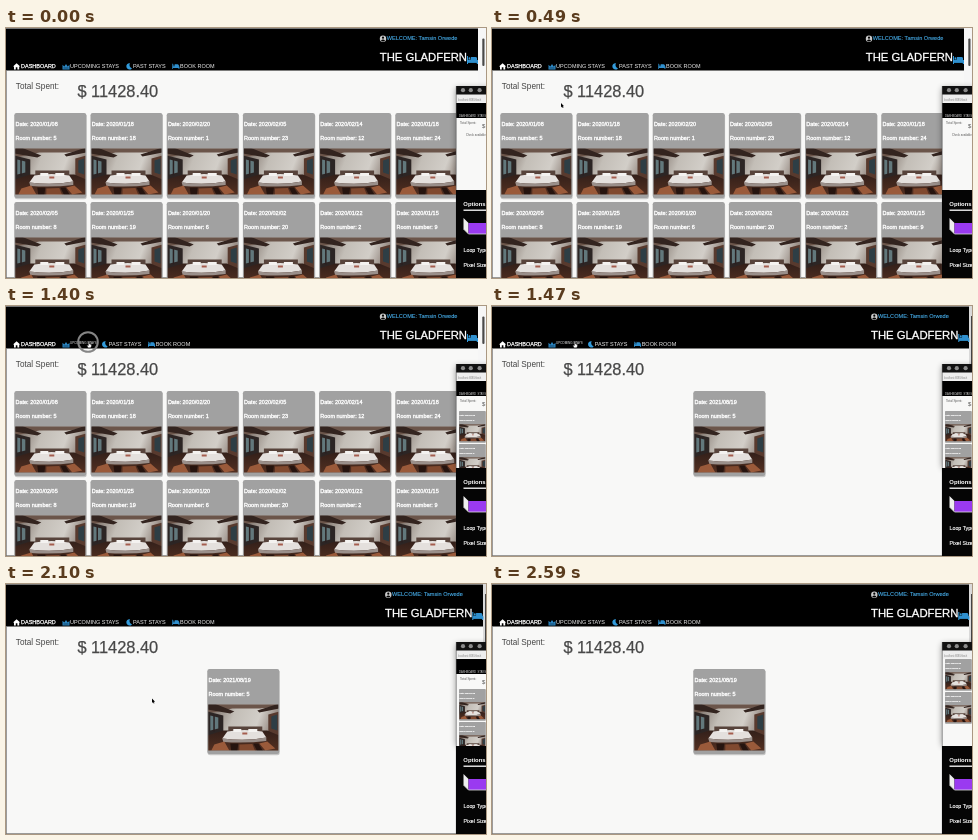
Recreate the animation shown at these times as an HTML page. Size 480 px wide and 250 px high, loop 2660 ms.

```html
<!DOCTYPE html>
<html lang="en">
<head>
<meta charset="utf-8">
<title>Room dashboard</title>
<style>
html, body { margin: 0; width: 100%; height: 100%; overflow: hidden; background: #f8f8f7; }
svg { display: block; width: 480px; height: 250px; }
text { font-family: "Liberation Sans", Arial, sans-serif; white-space: pre; }
.nav { font-size: 5.5px; fill: #eee; }
.card { font-size: 5.5px; fill: #fff; stroke: #fff; stroke-width: .34px; }
</style>
</head>
<body>
<svg viewBox="0 0 480 250">
  <defs>
    <linearGradient id="wall" x2="1" y2=".25">
      <stop offset="0" stop-color="#6d5f57"/>
      <stop offset=".4" stop-color="#c3beb7"/>
      <stop offset=".75" stop-color="#d2cec8"/>
      <stop offset="1" stop-color="#8d8078"/>
    </linearGradient>
    <linearGradient id="floor" x2="0" y2="1">
      <stop offset="0" stop-color="#33201a"/>
      <stop offset="1" stop-color="#543021"/>
    </linearGradient>
    <filter id="soft"><feGaussianBlur stdDeviation=".5"/></filter>
    <filter id="shade" x="-50%" y="-20%" width="200%" height="140%"><feGaussianBlur stdDeviation="3"/></filter>
    <clipPath id="frame"><rect width="70" height="46"/></clipPath>
    <clipPath id="view"><rect x="450" y="74" width="30" height="88"/></clipPath>
    <g id="room" clip-path="url(#frame)">
      <rect width="70" height="46" fill="url(#wall)"/>
      <g filter="url(#soft)">
        <path d="M-1-1H71V2L52 4H24L0 9Z" fill="#6b554a"/>
        <path d="M-1-1H6L26 7 22 9-1 5ZM71-1L49 6 51 8 71 4Z" fill="#33241f"/>
        <path d="M-1 7L15 11V29L-1 34Z" fill="#2c2524"/>
        <path d="M2 11L10 13V24L2 26Z" fill="#62787c"/>
        <path d="M5 11H6.5V27H5Z" fill="#2a2020"/>
        <path d="M60 10L71 7V34L60 29Z" fill="#583a2e"/>
        <path d="M63 12L69 10V26L63 24Z" fill="#2e3e45"/>
        <path d="M-1 31L15 26H59L71 31V47H-1Z" fill="url(#floor)"/>
        <path d="M20 22H54V27H20Z" fill="#57433b"/>
        <path d="M19 27Q36 24 54 27L58 33Q38 37 14 34Z" fill="#e4e0dd"/>
        <path d="M14 34Q38 37 58 33V36.5Q38 39 15 37.5Z" fill="#9a8f8a"/>
        <path d="M25 24.5H33V27.5H25ZM40 24.5H49V27.5H40Z" fill="#f4f2f0"/>
        <path d="M34 28H39V30H34Z" fill="#a45d4e"/>
        <path d="M6 40L16 37 21 46H3ZM51 39L59 37 67 44 57 46Z" fill="#9a5a3a"/>
        <path d="M31 40L44 39.5 47 47H31Z" fill="#80492f"/>
        <path d="M22 39H30L29 47H23ZM45 39H50L55 47H49Z" fill="#26140f"/>
      </g>
    </g>
    <g id="bed">
      <path d="M0 0H1V4H10V2.6Q10 1 8 1H4V3.4H1.4V5.3H11V8H9.8V6.7H1V8H0Z" fill="#329bdc"/>
      <path d="M1 4H11V6.5H1ZM4 1H8Q10 1 10 3V4H4Z" fill="#2f8fce"/>
      <circle cx="2.5" cy="2.2" r="1" fill="#329bdc"/>
    </g>
  </defs>

  <rect width="480" height="250" fill="#f8f8f7"/>
  <rect id="bar" width="472" height="42.5"/>
  <rect width="480" height="1" fill="#777"/>
  <g id="scroll">
    <rect x="472" width="8" height="58" fill="#f6f6f6"/>
    <rect x="476.3" y="10.5" width="2.2" height="27.5" rx="1" fill="#4a4a4a"/>
  </g>
  <g id="edge">
    <rect x="477" width="3" height="58" fill="#d9d9d9"/>
    <rect x="479" y="10" width="1" height="48" fill="#444"/>
  </g>
  <path d="M.4 42V250M0 249.6H450" stroke="#777" stroke-width=".8"/>

  <g id="brand">
    <circle cx="377" cy="10.7" r="3.2" fill="#c9c9c9"/>
    <circle cx="377" cy="9.7" r="1.1"/>
    <path d="M374.9 12.8Q377 10.2 379.1 12.8Q377 14.4 374.9 12.8Z"/>
    <text x="380.7" y="12.3" font-size="5.6" fill="#45a9e4" stroke="#45a9e4" stroke-width=".12">WELCOME: Tamsin Orwede</text>
    <text x="461" y="32.7" font-size="11.3" fill="#fff" stroke="#fff" stroke-width=".3" text-anchor="end">THE GLADFERN</text>
    <use href="#bed" x="461" y="28"/>
  </g>

  <path d="M7 38.6L10.6 35.2 14.2 38.6H13.2V41.4H11.4V39.3H9.8V41.4H8V38.6Z" fill="#fff"/>
  <text class="nav" x="15" y="40.2" style="fill:#fff;stroke:#fff;stroke-width:.25px">DASHBOARD</text>
  <path d="M56.5 36.8L58.3 38.6 60 36 61.7 38.6 63.5 36.8V41.4H56.5Z" fill="#2b86c2"/>
  <path d="M57.5 40H62.5" stroke="#0b2a40" stroke-width=".7"/>
  <text class="nav" id="stays" x="64" y="40.2">UPCOMING STAYS</text>
  <g id="rest">
    <path d="M124 35.2A3.2 3.2 0 1 0 126 40.4A3.5 3.5 0 0 1 124 35.2Z" fill="#329bdc"/>
    <text class="nav" x="127" y="40.2">PAST STAYS</text>
    <use href="#bed" transform="translate(166.3 35.8) scale(.64)"/>
    <text class="nav" x="174" y="40.2">BOOK ROOM</text>
  </g>

  <text x="9.8" y="60.6" font-size="8.2" fill="#444">Total Spent:</text>
  <text x="71.4" y="69.4" font-size="16.4" fill="#484848" stroke="#484848" stroke-width=".25">$ 11428.40</text>
  <g id="all"></g>
  <g id="one"></g>

  <g id="side">
    <rect x="450" y="60" width="40" height="102" fill="#000" opacity=".4" filter="url(#shade)"/>
    <rect x="450" y="58" width="30" height="104" fill="#f8f8f7"/>
    <g clip-path="url(#view)"><g id="page">
      <rect x="450" y="75" width="30" height="15"/>
      <text x="453" y="88.5" font-size="2.7" fill="#ddd">DASHBOARD  STAYS</text>
      <text x="454" y="95.6" font-size="3.1" fill="#555">Total Spent:</text>
      <text x="476" y="99.5" font-size="6" fill="#555">$</text>
      <text id="note" x="460" y="108" font-size="2.8" fill="#555">Check available</text>
      <g id="minis"></g>
    </g></g>
    <rect x="450" y="66" width="30" height="8.5" fill="#eee"/>
    <text x="452" y="72.8" font-size="2.6" fill="#888">localhost:8080/dash</text>
    <rect x="450" y="58" width="30" height="8.5" fill="#111"/>
    <g fill="#8b8b8b"><circle cx="457" cy="62.2" r="2.1"/><circle cx="464.8" cy="62.2" r="2.1"/><circle cx="473.6" cy="62.2" r="2.1"/></g>
    <path d="M450.3 58V250" stroke="#555" stroke-width=".6"/>
    <rect x="450" y="162" width="30" height="88" fill="#050505"/>
    <text x="457.3" y="178" font-size="5.9" font-weight="bold" fill="#fff">Options</text>
    <path d="M457.5 182.2H480" stroke="#fff" stroke-width="1.3"/>
    <path d="M457.5 190L462.5 195V206L457.5 201Z" fill="#eee"/>
    <path d="M462.5 195H480V206H462.5Z" fill="#9a3af0"/>
    <path d="M457.5 201L462.5 206H480" fill="none" stroke="#ddd" stroke-width=".8"/>
    <text x="457.5" y="223.7" font-size="5.3" fill="#fff" stroke="#fff" stroke-width=".15">Loop Type</text>
    <text x="457.5" y="238.5" font-size="5.3" fill="#fff" stroke="#fff" stroke-width=".15">Pixel Size</text>
  </g>

  <circle id="ring" cx="82" cy="36" r="9.8" fill="none" stroke="#858585" stroke-width="2"/>
  <path id="arrow" d="M0 0V4.4L1 3.5 1.7 5 2.5 4.7 1.8 3.2H3.1Z" stroke="#fff" stroke-width=".5" paint-order="stroke"/>
  <path id="hand" d="M-.6-2.4Q0-3 .5-2.4V0L2.4.6Q2.8 2.5 1.6 3.8H-.9L-2.2 1.2-.6 1.5Z" fill="#fff" stroke="#222" stroke-width=".4"/>
</svg>
<script>
const $ = id => document.getElementById(id);
const STEP = 70, LOOP = 2660;

const card = (x, y, date, room) => `<g transform="translate(${x} ${y})">
  <rect x=".4" y=".8" width="72" height="85.4" rx="2.5" fill="#000" opacity=".2"/>
  <rect width="72" height="85" rx="2.2" fill="#a1a1a1"/>
  <text class="card" x="1.2" y="13.3">Date: ${date}</text>
  <text class="card" x="1.2" y="27">Room number: ${room}</text>
  <use href="#room" x="1" y="35.5"/></g>`;

const stays = [
  ["01/08", 5], ["01/18", 18], ["02/20", 1], ["02/05", 23], ["02/14", 12], ["01/18", 24],
  ["02/05", 8], ["01/25", 19], ["01/20", 6], ["02/02", 20], ["01/22", 2], ["01/15", 9]
];
$("all").innerHTML = stays.map(([day, room], i) =>
  card(8.3 + (i % 6) * 76.2, 85 + (i > 5 ? 89 : 0), "2020/" + day, room)).join("");
$("one").innerHTML = card(201.3, 85, "2021/08/19", 5);
$("minis").innerHTML = [0, 1].map(i =>
  `<g transform="translate(453 ${105 + i * 33}) scale(.37)">${card(0, 0, "2020/01/08", 5)}</g>`).join("");

// pointer path: time, x, y
const path = [
  [70, 482, 212], [280, 260, 150], [490, 69, 75], [630, 69, 74], [980, 81.5, 32.5],
  [1120, 83, 38], [1680, 83, 38], [1820, 100, 56], [2030, 146, 114.5],
  [2240, 146, 114.5], [2520, 482, 235]
];
const ease = k => k * k * (3 - 2 * k);
const span = (t, a, b) => ease(Math.min(1, Math.max(0, (t - a) / (b - a))));

function pointer(t) {
  let i = 1;
  while (i < path.length - 1 && t > path[i][0]) i++;
  const [a, x, y] = path[i - 1], [b, u, v] = path[i], k = span(t, a, b);
  return [x + (u - x) * k, y + (v - y) * k];
}

const show = (id, on) => $(id).setAttribute("visibility", on ? "visible" : "hidden");
const move = (id, x, y) => $(id).setAttribute("transform", `translate(${x} ${y})`);

function draw(t) {
  const upcoming = t >= 1470, hover = t >= 1050 && t < 1750, loaded = t >= 1190;
  show("all", !upcoming);
  show("scroll", !upcoming);
  show("one", upcoming);
  show("edge", upcoming);
  $("bar").setAttribute("width", upcoming ? 477 : 472);
  move("brand", upcoming ? 5.3 : 0, 0);

  $("stays").style.fontSize = hover ? "3px" : "5.5px";
  $("stays").setAttribute("y", hover ? 37.5 : 40.2);
  move("rest", hover ? -24.3 : 0, 0);

  show("minis", loaded);
  show("note", !loaded);
  move("page", 0, -30 * span(t, 2310, 2520));

  const [x, y] = pointer(t);
  move("arrow", x, y);
  move("hand", x, y);
  show("arrow", !hover && t >= 70 && t < 2520);
  show("hand", hover);
  show("ring", t >= 1260 && t < 1470);
}

function tick(now) {
  draw(Math.floor((now % LOOP) / STEP) * STEP);
  requestAnimationFrame(tick);
}
draw(0);
requestAnimationFrame(tick);
</script>
</body>
</html>
```
